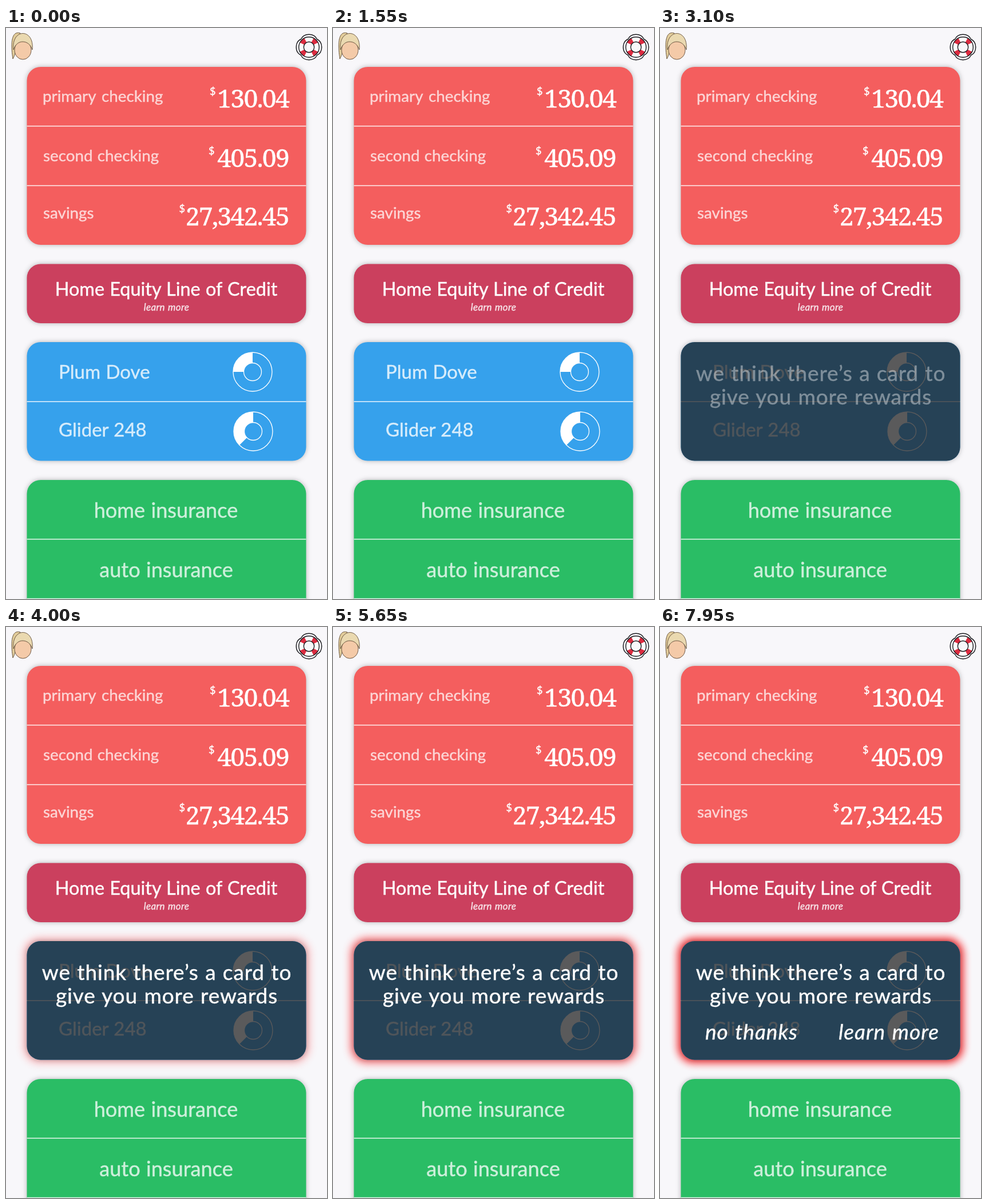
Recreate the animation shown at these times as an HTML page. Size 561 px wide and 998 px high, loop 8000 ms.

```html
<!DOCTYPE html>
<html lang="en">
<head>
<meta charset="utf-8">
<title>Account overview</title>
<style>
  html, body { margin: 0; width: 100%; height: 100%; overflow: hidden; background: #f8f7fa; }
  svg { display: block; width: 100vw; height: 100vh; }
  text { font-family: Lato, sans-serif; fill: #fff; stroke: #fff; stroke-width: .45; word-spacing: 1px; }
  .card { filter: drop-shadow(0 0 4px rgba(0, 0, 0, .28)); }
  .rule { stroke: #fff; stroke-opacity: .9; stroke-width: 1.3; }
  .label { font-size: 27.8px; opacity: .74; }
  .amount { font: 44.5px "Noto Serif", serif; letter-spacing: -1.8px; text-anchor: end; }
  .dollar { font-size: 18px; }
  .mid { text-anchor: middle; }
  .product { font-size: 33px; opacity: .8; }
  .insurance { font-size: 36.2px; opacity: .77; text-anchor: middle; }
  .offer { font-size: 37px; letter-spacing: .9px; text-anchor: middle; }
  .choice { font-size: 37px; font-style: italic; letter-spacing: 1px; word-spacing: 2px; }
  .ring { fill: none; stroke: #fff; stroke-width: 1.3; }
  #glow { filter: blur(7px); }
</style>
</head>
<body>
<svg viewBox="0 0 561 998" preserveAspectRatio="none">
  <!-- avatar -->
  <g stroke="#5f4a36" stroke-width=".9" stroke-linejoin="round">
    <path fill="#e2cd9b" d="M25 9C9 4 8 28 12 54C18 44 17 28 22 16Z"/>
    <ellipse fill="#f4caa8" cx="29.5" cy="38.5" rx="14.5" ry="16.5"/>
    <path fill="#ead9b0" d="M13 38C9 0 50 0 46 38C43 29 37 24 29 24C22 24 16 29 13 38Z"/>
  </g>

  <!-- lifebuoy -->
  <g transform="translate(529.5 33.5)" fill="none" stroke="#1b1b1f" stroke-width="1.4">
    <path d="M-14-14C-9-25 9-25 14-14C25-9 25 9 14 14C9 25-9 25-14 14C-25 9-25-9-14-14Z"/>
    <circle r="13.5" stroke="#fff" stroke-width="8.5"/>
    <circle r="13.5" stroke="#dc2b40" stroke-width="8.5" pathLength="360" stroke-dasharray="36 54" stroke-dashoffset="-27"/>
    <circle r="17.8"/>
    <circle r="9.2"/>
  </g>

  <!-- accounts -->
  <rect class="card" x="36.5" y="68" width="488" height="311" rx="24" fill="#f45e5e"/>
  <path class="rule" d="M36.5 171.5h488M36.5 275.5h488"/>
  <text class="label" x="64" y="129" style="word-spacing:3px">primary checking</text>
  <text class="label" x="65" y="233">second checking</text>
  <text class="label" x="65" y="333">savings</text>
  <text class="dollar" x="356" y="117">$</text>
  <text class="dollar" x="354" y="221">$</text>
  <text class="dollar" x="302.5" y="322">$</text>
  <text class="amount" x="494" y="138.5">130.04</text>
  <text class="amount" x="494" y="242.5">405.09</text>
  <text class="amount" x="494" y="344.5">27,342.45</text>

  <!-- credit line -->
  <rect class="card" x="36.5" y="412.5" width="488" height="103.5" rx="24" fill="#cb405e"/>
  <text class="mid" x="280" y="468" font-size="32.4">Home Equity Line of Credit</text>
  <text class="mid" x="280.5" y="494" font-size="17" font-style="italic" opacity=".85" letter-spacing=".3">learn more</text>

  <!-- cards with offer -->
  <rect id="glow" x="30" y="542.5" width="501" height="220.5" rx="29" fill="#fa4246" opacity="0"/>
  <rect class="card" x="36.5" y="549" width="488" height="207.5" rx="24" fill="#36a1ec"/>
  <path class="rule" d="M36.5 653h488"/>
  <text class="product" x="92" y="613">Plum Dove</text>
  <text class="product" x="92" y="714">Glider 248</text>
  <g class="ring">
    <circle cx="431" cy="601" r="34"/><circle cx="431" cy="601" r="15.5"/>
    <circle cx="432" cy="705" r="34"/><circle cx="432" cy="705" r="15.5"/>
  </g>
  <g fill="#fff">
    <path d="M431 567A34 34 0 0 0 397 601H415.5A15.5 15.5 0 0 1 431 585.5Z"/>
    <path d="M432 671A34 34 0 0 0 408 729L421 716A15.5 15.5 0 0 1 432 689.5Z"/>
  </g>
  <rect id="shade" x="36.5" y="549" width="488" height="207.5" rx="24" fill="#212122" opacity="0"/>
  <g id="offer" opacity="0">
    <text class="offer" x="281" y="617">we think there’s a card to</text>
    <text class="offer" x="281" y="658">give you more rewards</text>
  </g>
  <g id="choices" opacity="0">
    <text class="choice" x="79" y="720.5">no thanks</text>
    <text class="choice" x="312" y="720.5">learn more</text>
  </g>

  <!-- insurance -->
  <rect class="card" x="36.5" y="790" width="488" height="311" rx="24" fill="#2abd65"/>
  <path class="rule" d="M36.5 893.5h488M36.5 997.5h488"/>
  <text class="insurance" x="279.5" y="856">home insurance</text>
  <text class="insurance" x="280" y="960">auto insurance</text>
</svg>
<script>
  const LOOP = 8000, FADE = 500;
  const PULSE_START = 3500, PULSE_HALF = 1500, PULSE_LOW = .25;

  const fadeIn = (t, start) => Math.min(1, Math.max(0, (t - start) / FADE));
  const setOpacity = (id, value) => document.getElementById(id).setAttribute('opacity', value);

  // Rises from nothing, then swings between full strength and PULSE_LOW.
  function glowLevel(t) {
    const phase = (t - PULSE_START) / PULSE_HALF;
    if (phase < 1) return Math.max(0, phase);
    return 1 - (1 - PULSE_LOW) * Math.abs(phase % 2 - 1);
  }

  function draw() {
    const t = performance.now() % LOOP;
    setOpacity('shade', .74 * fadeIn(t, 2000));
    setOpacity('offer', fadeIn(t, 2900));
    setOpacity('choices', fadeIn(t, 6000));
    setOpacity('glow', glowLevel(t));
    requestAnimationFrame(draw);
  }
  draw();
</script>
</body>
</html>
```
